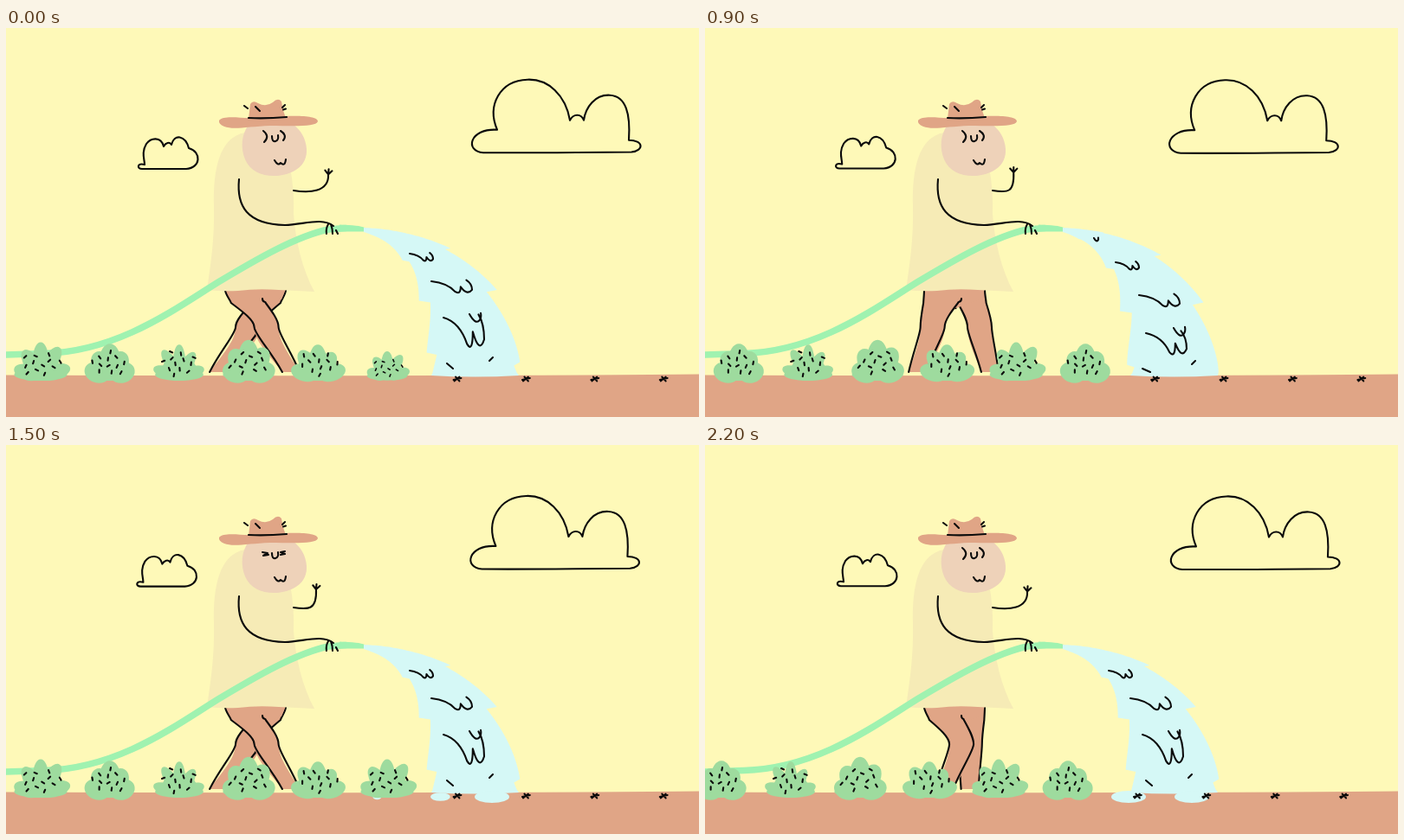
Animation of 800 by 450 pixels, one loop 2.3 s. Source, as an HTML page with a canvas:

```html
<!DOCTYPE html>
<html lang="en">
<head>
<meta charset="utf-8">
<title>Watering the garden</title>
<style>
html, body { margin: 0; width: 100%; height: 100%; overflow: hidden; background: #fef9b8; }
canvas { display: block; width: 800px; height: 450px; }
</style>
</head>
<body>
<canvas id="stage" width="800" height="450"></canvas>
<script>
const ctx = document.getElementById('stage').getContext('2d');
const INK = '#0b0b0b', SKY = '#fef9b8', EARTH = '#e0a586', COAT = '#f6ebb6', SKIN = '#eed2b9';
const HOSE = '#9ff2b0', LEAF = '#9edb9e', WATER = '#d5f8f6';
const STEPS = 23, STEP_MS = 100, TAU = 2 * Math.PI;

const mix = (a, b, u) => a + (b - a) * u;
const frac = x => x - Math.floor(x);
const clamp01 = x => Math.max(0, Math.min(1, x));
const noise = k => frac(Math.sin(k * 12.9898) * 43758.5453);
const bezier = (a, b, c, d, u) =>
  a * (1 - u) ** 3 + 3 * b * u * (1 - u) ** 2 + 3 * c * u * u * (1 - u) + d * u ** 3;

function fill(path, color) { ctx.fillStyle = color; ctx.fill(path); }
function ink(path, width = 2.1, color = INK) {
  ctx.strokeStyle = color;
  ctx.lineWidth = width;
  ctx.stroke(path);
}
function at(x, y, paint) {
  ctx.save();
  ctx.translate(x, y);
  paint();
  ctx.restore();
}

// ---- scenery
const bigCloud = new Path2D('M567 118C535 116 529 143 551 144.500C610 145 660 144 722 143.800C737 142 736 130 719 130C721 100 716 79 697 78C680 77 669 92 667 107C664 99 655 99 651 107C646 78 626 59 602 60C570 61 555 90 567 118');
const smallCloud = new Path2D('M160 158C151 156 151 163 157 163L208 163C225 162 226 143 211 139C207 124 194 122 191 135C189 131 184 133 182 137C179 125 167 127 162 134C156 144 160 152 160 158');
const ground = new Path2D('M0 401.500Q300 402.500 500 402T800 400.500V450H0Z');
const hose = new Path2D('M0 378L45 376.500C130 374 195 325 245 294C290 267 335 241 372 233L392 231.500');
const nozzle = new Path2D('M385 227.500Q408 228 414 231Q417 234 413 235.500L385 235.500Z');

function drawClouds(t) {
  const a = t / STEPS * TAU, dx = Math.cos(a) - 1, dy = Math.sin(a);
  at(dx, .9 * dy - .3, () => ink(bigCloud));
  at(dx, -.8 * dy, () => ink(smallCloud));
}

// ---- person
const coat = new Path2D('M276 121C246 126 239 165 240 205C241 245 236 275 232 303Q250 305 268 304Q290 301 315 303L356 305C342 280 334 245 332 215Q333 190 328 160Z');
const head = new Path2D('M280 112C271 124 271 140 276 152C282 166 296 172 313 171C334 169 348 158 347 140C346 127 340 118 331 111Z');
const brim = new Path2D('M246 107C250 101 268 104 281 104L322 102C340 101 360 102 360 108C358 115 330 113 305 113C280 114 262 118 252 114Q245 111 246 107Z');
const crown = new Path2D('M280 105L282 88Q285 83 291 87Q300 92 308 86Q314 80 318 85Q319 95 323 104Z');
const hatLines = new Path2D('M280 104Q300 105 324 103M275 90L279 93M288 91L293 96M319 92L322 89M320 94.500L323 93.500');
const eyes = new Path2D('M297 119Q305 125 298 132M317 119Q325 124 320 130');
const blink = new Path2D('M296 124L302 125L297 128L303 127M322 123L317 124L322 126L317 127');
const mouth = new Path2D('M307 125Q307 132 311 131Q315 130 314 124M310 153Q314 160 317 156Q322 161 323 152');
const holdArm = new Path2D('M269 175C266 206 278 227 322 228C345 227 365 219 378 229M372 227Q369 232 370 238M375 227Q377 232 377 238M381 234L383 238');

// one edge of a leg, from hip over thigh and knee to the ankle
function legEdge(path, hip, top, knee, foot) {
  const thigh = mix(hip, knee, .2);
  path.moveTo(hip, top);
  path.bezierCurveTo(hip, top + 5, thigh, 316, thigh, 318);
  path.bezierCurveTo(mix(thigh, knee, .5), 328, knee, 338, knee, 346);
  path.bezierCurveTo(knee, 354, mix(knee, foot, .6), 374, foot, 398);
}

function drawLeg(left, right, phase, innerTop, innerRight) {
  const a = phase / 8 * TAU;
  const foot = 287 + 47 * Math.cos(a + .47) + 8 * Math.sin(a) ** 2;
  const lift = Math.max(0, Math.cos(a - 4.24)) ** 3;
  const knee = mix((left + right) / 2, foot, .48) + 24 * lift;
  const edges = [[left, innerRight ? 303 : innerTop, -1], [right, innerRight ? innerTop : 303, 1]];
  const lines = new Path2D(), shape = new Path2D();
  for (const [hip, top, side] of edges) legEdge(lines, hip, top, knee + 14 * side, foot + 10 * side);
  // the body of the leg runs down one edge and back up the other
  const strips = 24;
  const x = (side, v) => {
    const hip = side < 0 ? left : right, k = knee + 14 * side, f = foot + 10 * side;
    const thigh = mix(hip, k, .2);
    return v < .16 ? mix(hip, thigh, v / .16)
      : v < .45 ? bezier(thigh, mix(thigh, k, .5), k, k, (v - .16) / .29)
      : bezier(k, k, mix(k, f, .6), f, (v - .45) / .55);
  };
  for (let i = 0; i <= strips; i++) shape.lineTo(x(-1, i / strips), 303 + 95 * i / strips);
  for (let i = strips; i >= 0; i--) shape.lineTo(x(1, i / strips), 303 + 95 * i / strips);
  fill(shape, EARTH);
  ink(lines);
}

function drawLegs(pose) {
  drawLeg(289, 323, pose + 4, 323, false);
  fill(new Path2D('M253 302H323L318 314L290 324L256 312Z'), EARTH);
  drawLeg(253, 296, pose, 313, true);
}

function drawWave(n) {
  const swing = Math.cos((n + 1.5) / 14 * TAU);
  const x = 365 + 9 * swing, y = 167 + 3 * Math.max(0, swing);
  const arm = new Path2D('M332 188');
  arm.bezierCurveTo(350, 191, x + 1, 190, x, y);
  for (const side of [-1, 0, 1]) {
    const a = .75 * side + .4 * (1 - Math.abs(swing));
    arm.moveTo(x, y);
    arm.lineTo(x + 6 * Math.sin(a), y - 6 * Math.cos(a));
  }
  ink(arm);
}

function drawPerson(n, pose, closed) {
  drawLegs(pose);
  fill(coat, COAT);
  fill(head, SKIN);
  fill(crown, EARTH);
  fill(brim, EARTH);
  ink(hatLines);
  ink(closed ? blink : eyes);
  ink(mouth);
  drawWave(n);
}

// ---- water
const TOOTH = .28;

// ragged edges whose teeth run down the stream with each beat
function stream(beat) {
  const shape = new Path2D(), N = 100;
  const tooth = (u, tip) => {
    const ragged = 22 * u * Math.sqrt(4 * u * (1 - u));
    return ragged * (frac(u / TOOTH - tip - .6 * beat) - .6);
  };
  for (let i = 0; i <= N; i++) {
    const u = i / N;
    shape.lineTo(bezier(413, 500, 580, 592, u) + tooth(u, .46), bezier(231, 235, 270, 402, u));
  }
  shape.quadraticCurveTo(540, 405, 491, 402);
  for (let i = N; i >= 0; i--) {
    const u = i / N;
    shape.lineTo(bezier(413, 475, 490, 491, u) - tooth(u, .21), bezier(236, 255, 320, 402, u));
  }
  return shape;
}

// a slide that ends in two small cups
function squiggle(path, x, y, w, h) {
  const q = (a, b, c, d) => path.quadraticCurveTo(x + a * w, y + b * h, x + c * w, y + d * h);
  path.moveTo(x, y);
  q(.4, .15, .58, .85);
  q(.72, 1.15, .72, .45);
  q(.88, 1.2, 1, .7);
  q(1, .2, .86, -.1);
}
function cup(path, x, y, s) {
  path.moveTo(x, y);
  path.quadraticCurveTo(x + .5 * s, y + .9 * s, x + .85 * s, y + .6 * s);
  path.quadraticCurveTo(x + 1.1 * s, y + .3 * s, x + s, y - .1 * s);
}

function ripples(b) {
  const p = new Path2D();
  squiggle(p, 466 + 4 * b, 261 + 5 * b, 27, 9);
  squiggle(p, 491 + 5 * b, 293 + 8 * b, 47, 14);
  squiggle(p, 505 + 2 * b, 335 + 9 * b, 47, 36 - 5 * b);
  cup(p, 535 + 3 * b, 331 + 8 * b, 13);
  if (b) cup(p, 457 - 4 * b, 253 - 5 * b, 9 - 2 * b);
  p.moveTo(509 - 2 * b, 388 + 3 * b);
  p.lineTo(516 - b, 394 + 2 * b);
  p.moveTo(558 + 2 * b, 385 + 2 * b);
  p.lineTo(562 + 2 * b, 381 + 2 * b);
  return p;
}

// puddles drift with the ground and dry up
function drawPuddle(pose, born, x, life) {
  const age = (pose - born + 8) % 8, r = 20 * (1 - age / life);
  if (r <= 0) return;
  const drop = new Path2D();
  drop.ellipse(x - 20.2 * age, 407, r, 2 + r / 4, 0, 0, TAU);
  fill(drop, WATER);
}

function drawWater(t, n, pose) {
  const beat = Math.floor((2.4 * t + 1.2001) % 6 / 2);
  fill(stream(beat), WATER);
  if (n) {
    drawPuddle(pose, 5, 562, 7);
    drawPuddle(pose, 5, 489, 4);
    drawPuddle(pose, 0, 561, 4);
  }
  ink(ripples(beat));
}

// ---- plants: a fan of leaves over a flat foot
function makeBush(seed, width, height, fat) {
  const shape = new Path2D(), ticks = new Path2D();
  const oval = (x, y, rx, ry, turn) => {
    const o = new Path2D();
    o.ellipse(x, y, rx, ry, turn, 0, TAU);
    shape.addPath(o);
  };
  oval(0, -6, width * .9, 7, 0);
  oval(0, -14, width * .62, 12, 0);
  for (let i = 0; i < 5; i++) {
    const a = Math.PI * (.08 + .21 * i), size = .9 + .16 * noise(seed * 7 + i);
    const x = -Math.cos(a) * width * size, y = -Math.sin(a) * height * size;
    const len = Math.hypot(x, y) / 2;
    oval(x / 2, y / 2 - 4, len, Math.min(fat, len), Math.atan2(y, x));
  }
  for (let i = 0; i < 12; i++) {
    const a = i * 2.4 + seed, r = Math.sqrt((i + .5) / 12);
    const x = width * .72 * r * Math.cos(a), y = -19 + 15 * r * Math.sin(a);
    const lean = 2.4 * noise(seed + i * 3) - 1.2;
    const dx = 1.7 * Math.sin(lean), dy = 1.7 * Math.cos(lean);
    ticks.moveTo(x - dx, y - dy);
    ticks.lineTo(x + dx, y + dy);
  }
  return { shape, ticks };
}
const bushes = [
  makeBush(1, 34, 40, 9), makeBush(2, 29, 36, 12), makeBush(3, 31, 38, 7),
  makeBush(4, 33, 40, 12), makeBush(5, 32, 35, 10)
];

function drawBushes(n, shift) {
  for (let i = 0; i < 8; i++) {
    const x = 40 + 80 * i - shift;
    if (x > 448) break;
    const { shape, ticks } = bushes[i % 5];
    // the newest one sprouts during the first steps
    const size = i < 5 ? 1 : clamp01(.76 + .12 * n);
    at(x, 407, () => {
      ctx.scale(size, size);
      fill(shape, LEAF);
      ink(ticks);
    });
  }
}

const sprout = new Path2D('M-4.500 1L4.500 -1M-2 -2.500L2.500 2.500M-3.500 2.500L2.500 -2.500');
function drawSprouts(shift) {
  for (let x = 521 - shift; x < 790; x += 79.4) {
    if (x > 450) at(x, 406, () => ink(sprout, 1.9));
  }
}

// walk count over the loop; eight counts make a full stride
const pace = [[0, 0], [9, 20], [11, 23], [15, 32], [23, 56]];
function walkCount(t) {
  const i = pace.findIndex(k => k[0] > t);
  const [t0, a] = pace[i - 1], [t1, b] = pace[i];
  return Math.round(mix(a, b, (t - t0) / (t1 - t0)));
}

function draw(t) {
  const n = walkCount(t), pose = n % 8, shift = 20.2 * pose;
  ctx.lineCap = ctx.lineJoin = 'round';
  ctx.fillStyle = SKY;
  ctx.fillRect(0, 0, 800, 450);
  drawClouds(t);
  fill(ground, EARTH);
  drawPerson(n, pose, t === 14 || t === 15);
  ink(hose, 7.6, HOSE);
  fill(nozzle, HOSE);
  ink(holdArm);
  drawWater(t, n, pose);
  drawBushes(n, shift);
  drawSprouts(shift);
}

const start = performance.now();
function tick(now) {
  draw(Math.floor(Math.max(0, now - start) / STEP_MS) % STEPS);
  requestAnimationFrame(tick);
}
draw(0);
requestAnimationFrame(tick);
</script>
</body>
</html>
```
